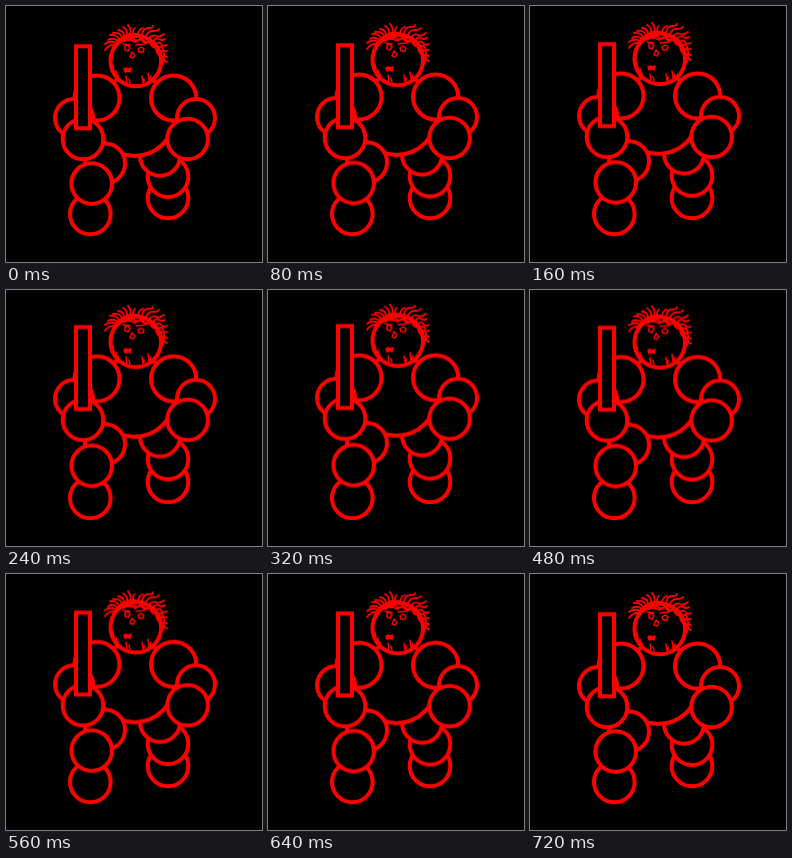
An HTML page for the animation above (800 ms loop, 256x256 px).

```html
<!DOCTYPE html>
<html lang="en">
<head>
<meta charset="utf-8">
<title>Breathing fighter</title>
<style>
html, body { margin: 0; width: 100%; height: 100%; overflow: hidden; background: #000; }
svg { display: block; width: 100vw; height: 100vh; }
circle, rect { fill: #000; stroke: #f00; stroke-width: 4; }
path { fill: none; stroke: #f00; stroke-width: 1.5; stroke-linecap: round; stroke-linejoin: round; }
.hair { stroke-width: 1.8; }
.solid { fill: #f00; }
.part { animation: breathe .8s infinite; }
.shin { --lift: -2.4px; }
.upper { --lift: -4.3px; }
.hip { --lift: -4.4px; }
/* Four quick steps up, five smaller ones down, then a short rest. */
@keyframes breathe {
  0% { transform: translateY(0); animation-timing-function: steps(4); }
  40% { transform: translateY(var(--lift)); animation-timing-function: steps(5); }
  90%, 100% { transform: translateY(0); }
}
</style>
</head>
<body>
<svg viewBox="0 0 256 256">
  <!-- right leg -->
  <circle cx="162" cy="192" r="20.3"/>
  <circle class="part shin" cx="162" cy="170.7" r="20.3"/>
  <circle class="part hip" cx="154" cy="149.7" r="20"/>

  <circle class="part upper" cx="128.5" cy="110" r="40"/>

  <!-- left leg -->
  <circle class="part hip" cx="99" cy="157.5" r="20"/>
  <circle cx="84.3" cy="208" r="20.3"/>
  <circle class="part shin" cx="85.7" cy="177.6" r="20.3"/>

  <g class="part upper">
    <!-- arms -->
    <circle cx="91" cy="92" r="22.5"/>
    <circle cx="167.6" cy="92" r="22.6"/>
    <circle cx="68" cy="112" r="19"/>
    <circle cx="190" cy="112" r="19"/>
    <circle cx="77" cy="133" r="20.3"/>
    <circle cx="181.6" cy="133" r="20.3"/>
    <rect x="70" y="40.3" width="14" height="82"/>

    <!-- head -->
    <circle cx="129.8" cy="55" r="25.3"/>
    <!-- loose strands, left to right -->
    <path class="hair" d="M109 39q-6-1-10 5M110 37q-6-3-11 1M112 35q-5-4-10-1M113 33q-3-5-9-4M116 31q-2-5-9-4M118 30q0-5-6-6M121 29q1-5-4-8M124 28q2-5-2-9M127 28q0-5 2-6M132 28q1-5 5-6"/>
    <path class="hair" d="M136 29q1-7 6-7t5-2M140 30q2-5 7-5t6-2M143 32q4-4 7-2t8-2M147 35q3-4 6-2t6 0M150 38q3-3 5 0t6 1M152 41q4-1 5 2t4 2M154 45q4 0 4 3t3 3M154 49q4 1 4 4t3 3M155 53q2 1 2 5"/>
    <!-- matted fringe -->
    <path class="hair" d="M107 41q5-8 11-11t12-2 14 5 10 14M109 39q7-2 9-7 3 4 9 0 4 5 9 0 2 5 8 4 1 5 6 6 0 5 4 8M113 36l6-1 4-2 6 3 5-3 5 4 5-1 3 5 4 1"/>
    <!-- face -->
    <path d="M117 38l7 1M130 39l9-1 3-2"/>
    <path d="M119 40l3-1 2 3-2 3-3-1zM132 43l3-2 3 2-1 3-4 0zM126 46l-2 5 3 1 2-3z"/>
    <path class="solid" d="M118 63l2-1 2 1 3-1-1 4-2-1-3 1z"/>
    <path d="M107 59l1 7M110 65l1 8M112 69l0 5M120 70l1 7M123 73l1 4M136 70l1 7M138 73l0 3M142 67l1 7M145 70l-1 4"/>
  </g>
</svg>
</body>
</html>
```
